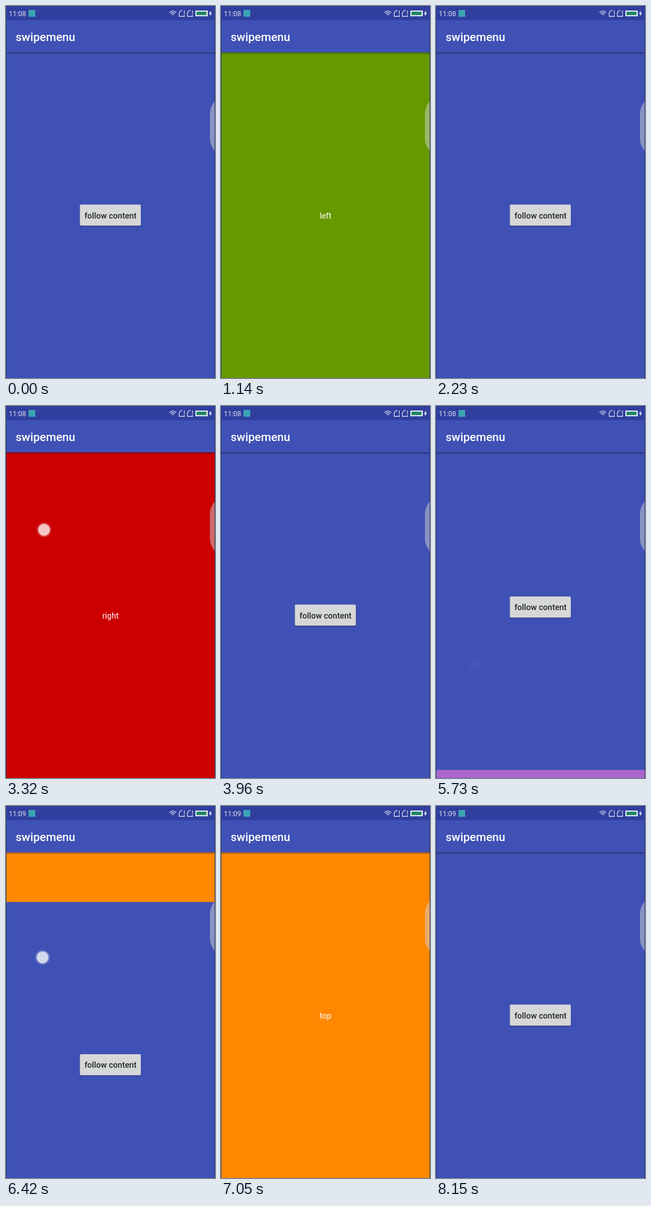
An HTML page that plays this animation: 372 px wide and 658 px high, repeating every 8.44 s.

```html
<!DOCTYPE html>
<html lang="en">
<head>
<meta charset="utf-8">
<title>swipemenu</title>
<style>
html, body { margin: 0; width: 100%; height: 100%; overflow: hidden; background: #3f51b5; }
svg { display: block; width: 100vw; height: 100vh; font-family: Roboto, sans-serif; }
.mid { text-anchor: middle; font-size: 14.47px; }
.bold { font-weight: 500; }
</style>
</head>
<body>
<svg viewBox="0 0 372 658">
  <defs>
    <linearGradient id="shade" x2="0" y2="1">
      <stop offset="0" stop-opacity=".36"/>
      <stop offset="1" stop-opacity="0"/>
    </linearGradient>
    <radialGradient id="glow">
      <stop offset=".62" stop-color="#fff" stop-opacity=".5"/>
      <stop offset="1" stop-color="#fff" stop-opacity="0"/>
    </radialGradient>
  </defs>

  <rect id="menu" y="82" width="372" height="576"/>
  <text id="label" class="mid" x="186" y="375.5" fill="#fff"></text>

  <g id="content">
    <rect y="82" width="372" height="576" fill="#3f51b5"/>
    <rect x="131" y="352" width="109.5" height="38" rx="2" fill="#000" opacity=".28"/>
    <rect x="131.5" y="351.3" width="108.5" height="37.2" rx="2" fill="#d6d7d7"/>
    <text class="mid bold" x="186" y="375.5" fill="#20272e">follow content</text>
  </g>

  <rect y="82" width="372" height="4" fill="url(#shade)"/>
  <rect width="372" height="82" fill="#3f51b5"/>
  <rect width="372" height="25" fill="#303f9f"/>
  <text class="bold" x="17.2" y="61.5" font-size="20.67" fill="#fff">swipemenu</text>

  <text id="clock" x="5" y="17.8" font-size="12.3" fill="#dfe2f1"></text>
  <rect x="40" y="7" width="12" height="12" fill="#3ba3b4"/>
  <g fill="none" stroke="#e4e7f5" stroke-width="1.2">
    <path d="M291 11.3q6-5 12 0M293 13.5q4-3.4 8 0M295 15.6q2-1.7 4 0"/>
    <path id="sim" d="M314 8.2h-2.6l-3 3.4v6.7h9v-2M317.4 8v5.2M317.4 14.2v1.3"/>
    <use href="#sim" x="14.5"/>
    <rect x="337.6" y="8.6" width="21" height="9" fill="#fff" stroke="#d7e4e8"/>
  </g>
  <rect x="339" y="10" width="18" height="6.2" fill="#218568"/>
  <path d="M364.8 8.2l-3.6 5.3h2.4l-1 4.6 4.2-5.7h-2.5z" fill="#fff"/>

  <path d="M372 167.5Q363 180 363 189V237Q363 245 372 257.5Z" fill="#d4d4d4" opacity=".5"/>
  <g id="touch">
    <circle r="14" fill="url(#glow)"/>
    <circle r="10.5" fill="#fff" opacity=".55"/>
  </g>
  <path d="M.5 25V658" stroke="#143c70" stroke-opacity=".75"/>
  <path d="M371.5 25V658" stroke="#16254a" stroke-opacity=".6"/>
</svg>
<script>
const LOOP = 8440, DRAG_END = 270, SETTLE = 300, DRAG = 0.49;
const W = 372, H = 576;
const $ = id => document.getElementById(id);
const clamp = v => Math.max(0, Math.min(1, v));

// dx, dy: where the content goes when the menu opens; finger: where the opening swipe starts
const menus = [
  { name: "left", color: "#669900", dx: 1, dy: 0, finger: [70, 225], open: 520, close: 1440 },
  { name: "right", color: "#cc0000", dx: -1, dy: 0, finger: [250, 219], open: 2300, close: 3320 },
  { name: "bottom", color: "#aa66cc", dx: 0, dy: -1, finger: [41, 457], open: 4267, close: 5325 },
  { name: "top", color: "#ff8800", dx: 0, dy: 1, finger: [65, 180], open: 6270, close: 7190 }
];

const dragged = t => Math.pow(clamp((t - 50) / (DRAG_END - 50)), 1.5);

// A finger drag followed by a quintic ease-out
function progress(t) {
  if (t < DRAG_END) return DRAG * dragged(t);
  return 1 - (1 - DRAG) * Math.pow(1 - clamp((t - DRAG_END) / SETTLE), 5);
}

function draw(now) {
  const time = now % LOOP;
  const menu = menus.filter(m => time >= m.open).pop() || menus[0];
  const closing = time >= menu.close;
  const t = time - (closing ? menu.close : menu.open);
  const p = closing ? 1 - progress(t) : progress(t);

  $("menu").setAttribute("fill", menu.color);
  $("label").textContent = menu.name;
  $("content").setAttribute("transform", `translate(${menu.dx * p * W} ${menu.dy * p * H})`);
  $("clock").textContent = time < 6170 ? "11:08" : "11:09";

  const pull = DRAG * (closing ? 1 - dragged(t) : dragged(t));
  const [x, y] = menu.finger;
  // The closing swipe of the bottom menu runs a little further right
  const shift = closing && menu.name === "bottom" ? 29 : 0;
  $("touch").setAttribute("transform",
    `translate(${x + shift + menu.dx * pull * W} ${y + menu.dy * pull * H})`);
  $("touch").setAttribute("opacity", t < 0 ? 0 : 1 - clamp((t - DRAG_END) / 140));
}

const start = performance.now();
function tick() {
  draw(performance.now() - start);
  requestAnimationFrame(tick);
}
tick();
</script>
</body>
</html>
```
